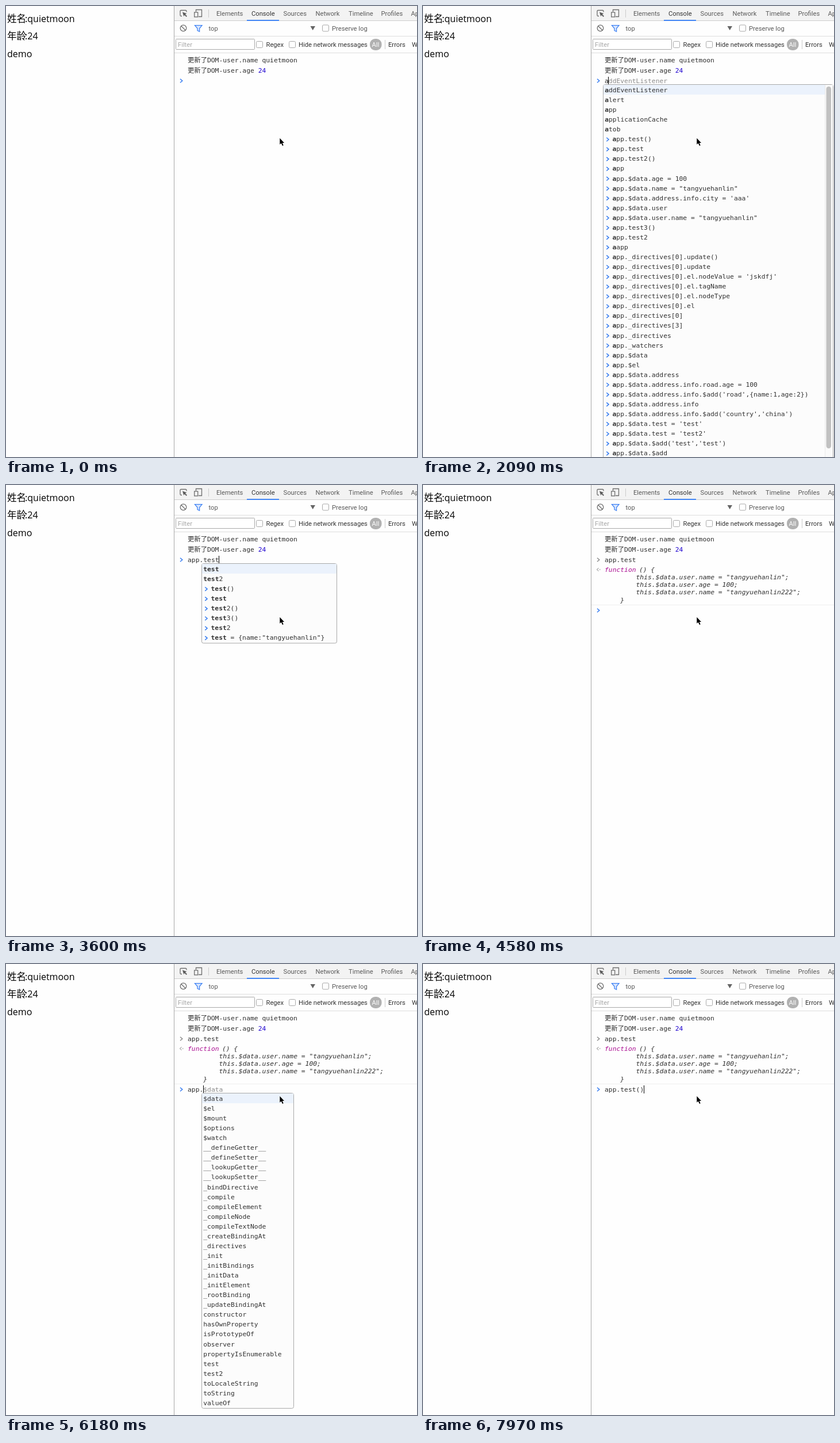
An HTML page for the animation above (8 s loop, 715x784 px).

```html
<!DOCTYPE html>
<html lang="zh-CN">
<head>
<meta charset="utf-8">
<title>Console demo</title>
<style>
  html, body { margin: 0; width: 100%; height: 100%; overflow: hidden; background: #fefefe; }
  svg { display: block; }
  text { white-space: pre; }
  .page { font: 16px "Open Sans", "Noto Sans CJK SC", "Noto Sans CJK JP", sans-serif; fill: #000; }
  .cjk { font-size: 16.5px; font-family: "Noto Sans CJK SC", "Noto Sans CJK JP", sans-serif; }
  .ui { font: 11.2px Roboto, "Liberation Sans", sans-serif; fill: #5a5a5a; }
  .mono { font: 11.33px "DejaVu Sans Mono", "Noto Sans CJK SC", "Noto Sans CJK JP", monospace; fill: #303030; }
  .bold { font-weight: bold; }
  .ital { font-style: italic; }
  .ghost { fill: #8a8a8a; }
  .num { fill: #1c00cf; }
  .key { fill: #aa0d91; }
  .line { fill: none; stroke: #6e6e6e; stroke-width: 1.3; }
  .box { fill: #fff; stroke: #a9a9a9; }
</style>
</head>
<body>
<svg width="715" height="784" viewBox="0 0 715 784">
  <rect width="715" height="784" fill="#fefefe"/>

  <g class="page">
    <text x="2" y="28" class="cjk">姓名</text><text x="33" y="28">:quietmoon</text>
    <text x="2" y="58" class="cjk">年龄</text><text x="33" y="58">:24</text>
    <text x="2" y="88.5">demo</text>
  </g>

  <!-- toolbars -->
  <rect x="293" width="422" height="26" fill="#f3f3f3"/>
  <path d="M293 25.5H715" stroke="#cccccc"/>
  <path d="M293 52.5H715M293 81.5H715" stroke="#dddddd"/>
  <rect x="419" y="24" width="56" height="2" fill="#4285f4"/>
  <path d="M292.5 0V784" stroke="#a6a6a6"/>
  <path d="M352.5 6V20M659.5 59V75" stroke="#cccccc"/>

  <path class="line" d="M306 17.5H304.5Q303 17.5 303 16V9Q303 7.5 304.5 7.5H312.5Q314 7.5 314 9V10.5"/>
  <path d="M307 10.5L314.5 13.2L311.8 14.4L315 17.6L313.7 18.9L310.5 15.7L309.3 18.3Z" fill="#5a5a5a"/>
  <path class="line" d="M330.5 10V6.5H340.5V18.5H335"/>
  <rect class="line" x="327.7" y="11" width="6" height="8"/>

  <circle class="line" cx="308.5" cy="38.5" r="5.3" stroke-width="1.6"/>
  <path class="line" d="M304.8 34.8L312.2 42.2"/>
  <path d="M328.5 33.7H341L336.6 39V44.5L333 42.7V39Z" fill="#d9e6fd" stroke="#4285f4" stroke-width="1.3"/>
  <path d="M529.5 35H538L533.7 42.3Z" fill="#666"/>

  <rect class="box" x="295.5" y="57.5" width="137" height="18" rx="1"/>
  <g class="box">
    <rect x="435.5" y="61.5" width="11" height="11" rx="2"/>
    <rect x="492.5" y="61.5" width="11" height="11" rx="2"/>
    <rect x="550.5" y="33" width="11" height="11" rx="2"/>
  </g>
  <rect x="633" y="57" width="20.5" height="20" rx="9" fill="#b1b1b1"/>
  <g id="labels" class="ui"></g>

  <g class="mono">
    <text x="316" y="98">更新了DOM-user.name quietmoon</text>
    <text x="316" y="116">更新了DOM-user.age <tspan class="num">24</tspan></text>
  </g>
  <g id="result" class="mono"></g>
  <g id="live" class="mono"></g>

  <path d="M476.3 229.8V240.8L478.8 238.6L480.9 243L482.7 242.2L480.7 238H484Z"
        fill="#000" stroke="#fff" stroke-linejoin="round" paint-order="stroke"/>
</svg>

<script>
const LOOP = 8000, LEFT = 316, CHAR = 6.82, ROW = 17.06, BLUE = '#367cf1';
const $ = id => document.getElementById(id);

const text = (x, y, s, cls = '') => `<text x="${x}" y="${y}" class="${cls}">${s}</text>`;
const chevron = (x, y, color) =>
  `<path d="M${x} ${y - 3.3}l3.8 3.3l-3.8 3.3" fill="none" stroke="${color}" stroke-width="1.5"/>`;

const labels = [
  [366, 17, 'Elements'], [427, 17, 'Console', '#333'], [482.5, 17, 'Sources'], [538.5, 17, 'Network'],
  [596, 17, 'Timeline'], [652.5, 17, 'Profiles'], [704.5, 17, 'Application'],
  [352.5, 42.5, 'top'], [567, 42.5, 'Preserve log'],
  [299, 71, 'Filter', '#a9a9a9'], [452.5, 71, 'Regex', '#333'], [509, 71, 'Hide network messages', '#333'],
  [636.5, 71, 'All', '#fff'], [665, 71, 'Errors', '#333'], [706, 71, 'Warnings', '#333']
];
$('labels').innerHTML = labels.map(([x, y, s, c = '#5a5a5a']) =>
  `<text x="${x}" y="${y}" style="fill:${c}">${s}</text>`).join('');

const body = ['this.$data.user.name = "tangyuehanlin";', 'this.$data.user.age = 100;',
  'this.$data.user.name = "tangyuehanlin222";'];
$('result').innerHTML =
  chevron(303, 130, '#8c8c8c') + text(LEFT, 134, 'app.test') +
  '<path d="M305.5 144.2l-3 2.8l3 2.8" fill="none" stroke="#b0b0b0" stroke-width="1.2"/>' +
  '<circle cx="307.7" cy="147" r="0.9" fill="#b0b0b0"/>' +
  text(LEFT, 150.5, '<tspan class="key">function</tspan><tspan dx="-1.5"> () {</tspan>', 'ital') +
  body.map((s, i) => text(LEFT + 8 * CHAR, 163.5 + i * 13.3, s, 'ital')).join('') +
  text(LEFT + 4 * CHAR, 203.5, '}', 'ital') +
  '<path d="M293 208.5H715" stroke="#eeeeee"/>';

const globals = 'addEventListener alert app applicationCache atob'.split(' ');
const members = ('$data $el $mount $options $watch __defineGetter__ __defineSetter__ __lookupGetter__ ' +
  '__lookupSetter__ _bindDirective _compile _compileElement _compileNode _compileTextNode ' +
  '_createBindingAt _directives _init _initBindings _initData _initElement _rootBinding ' +
  '_updateBindingAt constructor hasOwnProperty isPrototypeOf observer propertyIsEnumerable ' +
  'test test2 toLocaleString toString valueOf').split(' ');
const past = `test()
test
test2()

$data.age = 100
$data.name = "tangyuehanlin"
$data.address.info.city = 'aaa'
$data.user
$data.user.name = "tangyuehanlin"
test3()
test2
aapp
_directives[0].update()
_directives[0].update
_directives[0].el.nodeValue = 'jskdfj'
_directives[0].el.tagName
_directives[0].el.nodeType
_directives[0].el
_directives[0]
_directives[3]
_directives
_watchers
$data
$el
$data.address
$data.address.info.road.age = 100
$data.address.info.$add('road',{name:1,age:2})
$data.address.info
$data.address.info.$add('country','china')
$data.test = 'test'
$data.test = 'test2'
$data.$add('test','test')
$data.$add
test = {name:"tangyuehanlin"}
$data.info
$options
$watch`.split('\n').map(s => s === 'aapp' ? s : s ? 'app.' + s : 'app');
const pastLater = ['app.test', ...past.filter(s => s !== 'app.test')];

// start time, typed text, text the popup was built for, caret
const steps = [
  [0, '', '', 0], [750, '', '', 1], [1200, '', '', 0], [1700, '', '', 1],
  [2060, 'a', '', 1], [2090, 'a', 'a', 1], [2270, 'ap', 'a', 1], [2330, 'ap', 'ap', 1],
  [2480, 'app', 'ap', 1], [2540, 'app', 'app', 1], [2830, 'app.', 'app.', 1],
  [3100, 'app.t', 'app.', 1], [3150, 'app.t', 'app.t', 1], [3240, 'app.te', 'app.t', 1],
  [3290, 'app.te', 'app.te', 1], [3390, 'app.tes', 'app.tes', 1],
  [3570, 'app.test', 'app.tes', 1], [3600, 'app.test', 'app.test', 1], [4050, 'app.test', '', 1],
  [4070, '', '', 1], [4580, '', '', 0], [5060, '', '', 1],
  [5360, 'a', '', 1], [5390, 'a', 'a', 1], [5590, 'ap', 'a', 1], [5650, 'ap', 'ap', 1],
  [5800, 'app', 'ap', 1], [5850, 'app', 'app', 1], [6180, 'app.', 'app.', 1],
  [6360, 'app.t', 'app.', 1], [6410, 'app.t', 'app.t', 1], [6500, 'app.te', 'app.t', 1],
  [6550, 'app.te', 'app.te', 1], [6660, 'app.tes', 'app.te', 1], [6710, 'app.tes', 'app.tes', 1],
  [6940, 'app.test', 'app.test', 1], [7450, 'app.test', 'app.test', 0],
  [7680, 'app.test(', 'app.test', 1], [7710, 'app.test(', '', 1], [7970, 'app.test()', '', 1]
];

function complete(query, history) {
  const from = query.includes('.') ? 4 : 0;
  const prefix = query.slice(from);
  const names = (from ? members : globals).filter(s => s.startsWith(prefix));
  const old = prefix ? history.filter(s => s.startsWith(query)).map(s => s.slice(from)) : [];
  return { from, prefix, names, old };
}

function popup({ from, prefix, names, old }, top) {
  const x = from ? 340.5 : 313.5, y = top - 0.5, n = prefix.length;
  const count = names.length + old.length;
  const view = 884 - top;
  const w = from ? (prefix ? 235 : 160) : n > 1 ? 402 : 400;
  const h = from ? count * ROW + 2 : view;
  const rowW = from ? w - 1 : w - 15;
  let out = `<rect x="${x}" y="${y}" width="${w}" height="${h}" rx="3" fill="#fcfcfc" stroke="#a9a9a9"/>` +
    `<rect x="${x + .5}" y="${y + .5}" width="${rowW}" height="${ROW}" rx="1" fill="#ebf2fc"/>`;
  [...names, ...old].forEach((s, i) => {
    const base = top + 13 + i * ROW;
    if (base > 800) return;
    const past = i >= names.length;
    if (past) out += chevron(x + 5.8, base - 3.3, BLUE);
    out += text(x + (past ? 16 : 2.7), base, `<tspan class="bold">${s.slice(0, n)}</tspan>${s.slice(n)}`);
  });
  if (!from) {
    const bar = x + w - 14.5;
    const thumb = view * view / ((count + 10) * ROW);
    out += `<rect x="${bar}" y="${y + .5}" width="14" height="${view}" fill="#fafafa"/>` +
      `<path d="M${bar + .5} ${y + .5}V784" stroke="#e9e9e9"/>` +
      `<rect x="${bar + 2.5}" y="${top + 3}" width="8.5" height="${thumb}" rx="4.2" fill="#c1c1c1"/>`;
  }
  return out;
}

function render([time, typed, query, caret]) {
  const later = time >= 4070;
  const top = later ? 225 : 137;
  const base = top - 3;
  $('result').style.display = later ? '' : 'none';
  let ghost = '', list = '';
  if (query) {
    const found = complete(query, later ? pastLater : past);
    list = popup(found, top);
    if (query === typed) ghost = found.names[0].slice(found.prefix.length);
  }
  const caretX = Math.floor(LEFT + typed.length * CHAR);
  $('live').innerHTML = chevron(303, top - 7, BLUE) +
    text(LEFT, base, `${typed}<tspan class="ghost">${ghost}</tspan>`) +
    (caret ? `<rect x="${caretX}" y="${top - 14}" width="1" height="14" fill="#000"/>` : '') + list;
}

const start = performance.now();
let shown;
function tick() {
  const t = (performance.now() - start) % LOOP;
  const step = steps.findLast(s => s[0] <= t);
  if (step !== shown) render(shown = step);
  requestAnimationFrame(tick);
}
tick();
</script>
</body>
</html>
```
